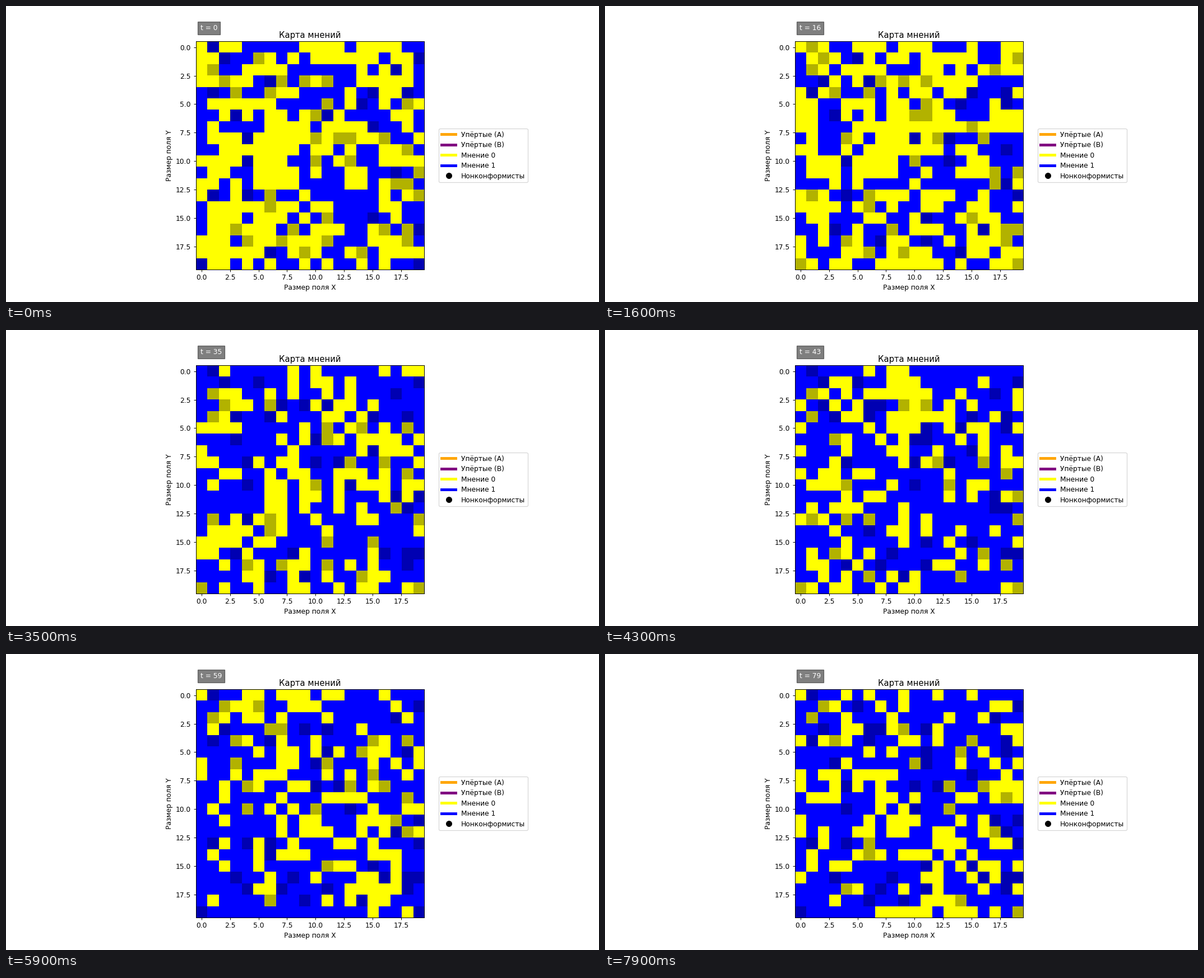
A matplotlib script for the animation above (8 s loop, 1058 by 529 pixels).

```python
import numpy as np
import matplotlib.pyplot as plt
from matplotlib.animation import FuncAnimation
from matplotlib.lines import Line2D

SIZE = 20
STEPS = 80
NONCONFORMISTS = 57
NOISE = 0.9
YELLOW = np.array([1.0, 1.0, 0.0])
BLUE = np.array([0.0, 0.0, 1.0])


def share(t):
    """Share of opinion 1: a rise from one plateau to a higher one."""
    return 0.43 + 0.22 / (1 + np.exp(-(t - 30) / 3))


def step(state, contrary, t, rng):
    """Each cell copies a random neighbour; nonconformists, any cell at all."""
    near = [state] + [np.roll(state, d, axis) for d in (-1, 1) for axis in (0, 1)]
    heard = np.choose(rng.integers(0, len(near), state.shape), near)
    anyone = rng.permutation(state.ravel()).reshape(state.shape)
    heard = np.where(contrary, anyone, heard)
    score = 2 * heard - 1 + rng.normal(0, NOISE, state.shape)
    return (score > np.quantile(score, 1 - share(t))).astype(int)


def simulate(seed=12, warmup=4):
    rng = np.random.default_rng(seed)
    contrary = np.zeros(SIZE * SIZE, bool)
    contrary[rng.choice(SIZE * SIZE, NONCONFORMISTS, replace=False)] = True
    contrary = contrary.reshape(SIZE, SIZE)
    state = (rng.random((SIZE, SIZE)) < share(0)).astype(int)
    history = []
    for t in range(-warmup, STEPS):
        state = step(state, contrary, t, rng)
        history.append(state)
    return history[warmup:], contrary


def paint(state):
    rgb = np.where(state[..., None] == 1, BLUE, YELLOW)
    return np.where(contrary[..., None], 0.7 * rgb, rgb)


history, contrary = simulate()

fig, ax = plt.subplots(figsize=(12, 6), dpi=88.1667)
image = ax.imshow(paint(history[0]), interpolation="nearest")
ax.set_title("Карта мнений", pad=5.2)
ax.set_xlabel("Размер поля X", labelpad=3.5)
ax.set_ylabel("Размер поля Y")
clock = ax.text(0.02, 1.05, "t = 0", transform=ax.transAxes, color="white",
                bbox=dict(facecolor="black", alpha=0.5))

labels = [("orange", "Упёртые (A)"), ("purple", "Упёртые (B)"),
          ("yellow", "Мнение 0"), ("blue", "Мнение 1")]
handles = [Line2D([0], [0], color=c, lw=4, label=name) for c, name in labels]
handles.append(Line2D([0], [0], marker="o", color="w", markerfacecolor="black",
                      markersize=10, label="Нонконформисты"))
ax.legend(handles=handles, loc="center left", bbox_to_anchor=(1.05, 0.5),
          labelspacing=0.447)


def update(t):
    image.set_data(paint(history[t]))
    clock.set_text(f"t = {t}")
    return image, clock


anim = FuncAnimation(fig, update, frames=STEPS, interval=100, repeat=True,
                     repeat_delay=0)
plt.show()
```
